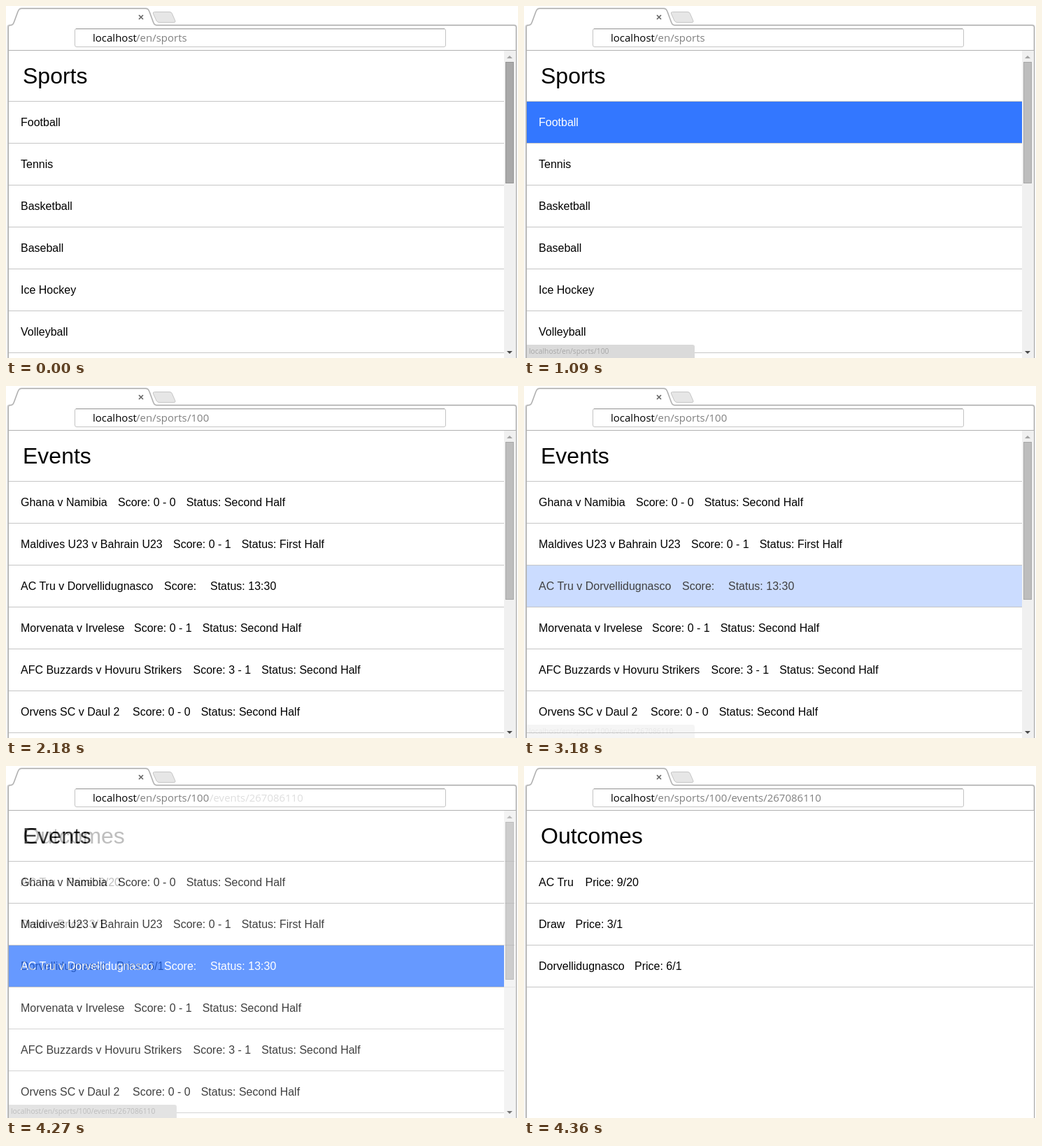
These frames come from a looping animation (732x504 px, 5.36 s). An HTML page:

```html
<!DOCTYPE html>
<html lang="en">
<head>
<meta charset="utf-8">
<title>Sports list navigation</title>
<style>
  html, body { margin: 0; width: 732px; height: 504px; overflow: hidden; background: #fff; }
  svg { display: block; }
  text { font: 16px "Liberation Sans", Arial, sans-serif; white-space: pre; }
  .title { font-size: 32px; }
  .url { font: 15px "Open Sans", "Noto Sans", sans-serif; fill: #808080; }
  .status { font: 10.3px "Open Sans", "Noto Sans", sans-serif; fill: #a6a6a6; }
</style>
</head>
<body>
<svg width="732" height="504" viewBox="0 0 732 504">
  <g fill="none">
    <path id="frame" d="M2.5 506V30Q2.5 27.5 5 27.5H7Q10 27.5 11.500 23L17 8Q18.500 3.500 22 3.500H200Q203.500 3.500 205 8L210.500 23Q212 27.500 215 27.500H727Q729.500 27.500 729.500 30V506" stroke="#d2d2d2" stroke-width="2"/>
    <path d="M3.5 506V30Q3.500 27.500 6 27.500H7Q10 27.500 11.500 23L17 8Q18.500 3.500 22 3.500H200Q203.500 3.500 205 8L210.500 23Q212 27.500 215 27.500H726Q729.500 27.500 729.500 30V506" stroke="#a9a9a9"/>
    <path d="M212.500 8.500H234Q236.500 8.500 237.500 11L242 21.500Q242.500 23.500 240 23.500H219Q216.500 23.500 215 21L210.500 11Q209.500 8.500 212.500 8.500Z" fill="#e6e6e6" stroke="#c6c6c6"/>
    <path d="M190 13L196 19M196 13L190 19" stroke="#666" stroke-width="1.700"/>
    <rect x="98.500" y="32.500" width="530" height="26" rx="2.500" stroke="#c4c4c4"/>
    <path d="M100 32.500H627" stroke="#a6a6a6"/>
    <path d="M100 33.500H627" stroke="#e4e4e4"/>
    <path d="M4 63.500H729" stroke="#b0b0b0"/>
  </g>
  <g id="scenes"></g>
</svg>
<script>
const LOOP = 5360, HOLD = 1000, PERIOD = 1090, STEP = 30, STEPS = 4;
const BLUE = '#37f';

const rect = (x, y, w, h, fill, extra = '') =>
  `<rect x="${x}" y="${y}" width="${w}" height="${h}" fill="${fill}" ${extra}/>`;
const text = (x, y, content, attrs = '') => `<text x="${x}" y="${y}" ${attrs}>${content}</text>`;

// Each row alternates text and the x of the next column.
const sports = ['Football', 'Tennis', 'Basketball', 'Baseball', 'Ice Hockey', 'Volleyball']
  .map(name => [21, name]);

const match = (teams, x, score, status) =>
  [21, teams, x, 'Score: ' + score, x + (score ? 97.7 : 66), 'Status: ' + status];
const events = [
  match('Ghana v Namibia', 160, '0 - 0', 'Second Half'),
  match('Maldives U23 v Bahrain U23', 239, '0 - 1', 'First Half'),
  match('AC Tru v Dorvellidugnasco', 226, '', '13:30'),
  match('Morvenata v Irvelese', 183, '0 - 1', 'Second Half'),
  match('AFC Buzzards v Hovuru Strikers', 267.5, '3 - 1', 'Second Half'),
  match('Orvens SC v Daul 2', 181, '0 - 0', 'Second Half')
];
const outcomes = [
  [21, 'AC Tru', 87.5, 'Price: 9/20'],
  [21, 'Draw', 73.5, 'Price: 3/1'],
  [21, 'Dorvellidugnasco', 158, 'Price: 6/1']
];

const urlParts = [[186, '/en/sports'], [259, '/100'], [291, '/events/267086110']];
const path = depth => urlParts.slice(0, depth).map(part => part[1]).join('');

function addressBar(depth) {
  return rect(104, 35, 520, 22, '#fff') + text(124, 51, 'localhost', 'class="url" style="fill:#000"') +
    urlParts.slice(0, depth).map(([x, part]) => text(x, 51, part, 'class="url"')).join('');
}

function scrollbar(thumbEnd, hover) {
  const [fill, edge] = hover ? ['#a9a9a9', '#959595'] : ['#bdbdbd', '#a8a8a8'];
  return rect(712, 64, 17, 440, '#f0f0f0') +
    rect(714.5, 80.5, 11, thumbEnd - 81, fill, `stroke="${edge}"`) +
    '<path d="M716 75L720 71L724 75Z" fill="#a3a3a3"/><path d="M716 494L720 498L724 494Z" fill="#484848"/>';
}

function statusBar(depth) {
  return '<path d="M4 504V485H241Q244 485 244 488V504Z" fill="#dadada"/>' +
    text(7, 498, 'localhost' + path(depth), 'class="status"');
}

function scene({ title, rows, depth, thumbEnd, hover, selected = -1 }) {
  const right = thumbEnd ? 712 : 728;
  let out = addressBar(depth) + rect(4, 64, 725, 440, '#fff') +
    text(24, 111, title, 'class="title"') + rect(4, 136, right - 4, 1, '#c6c6c6');
  rows.forEach((row, i) => {
    const top = 137 + 60 * i, active = i === selected;
    if (active) out += rect(4, top, right - 4, 59, BLUE);
    for (let k = 0; k < row.length; k += 2)
      out += text(row[k], top + 35, row[k + 1], `fill="${active ? '#fff' : '#000'}"`);
    out += rect(4, top + 59, right - 4, 1, '#c6c6c6');
  });
  if (thumbEnd) out += scrollbar(thumbEnd, hover);
  if (selected >= 0) out += statusBar(depth + 1);
  return `<g>${out}<path d="M729.5 64V504" stroke="#a9a9a9"/></g>`;
}

const sportsPage = { title: 'Sports', rows: sports, depth: 1, thumbEnd: 254 };
const eventsPage = { title: 'Events', rows: events, depth: 2, thumbEnd: 306 };
const root = document.getElementById('scenes');
root.innerHTML = [
  { ...sportsPage, hover: true },
  { ...sportsPage, selected: 0 },
  eventsPage,
  { ...eventsPage, selected: 2 },
  { title: 'Outcomes', rows: outcomes, depth: 3 }
].map(scene).join('');
const layers = [...root.children];

// Each later page fades over the previous one in four hard steps.
function draw(now) {
  const t = now % LOOP;
  layers.forEach((layer, i) => {
    if (!i) return;
    const step = Math.floor((t - HOLD - PERIOD * (i - 1)) / STEP) + 1;
    layer.setAttribute('opacity', Math.min(Math.max(step / STEPS, 0), 1));
  });
}

const start = performance.now();
function tick() {
  draw(performance.now() - start);
  requestAnimationFrame(tick);
}
tick();
</script>
</body>
</html>
```
